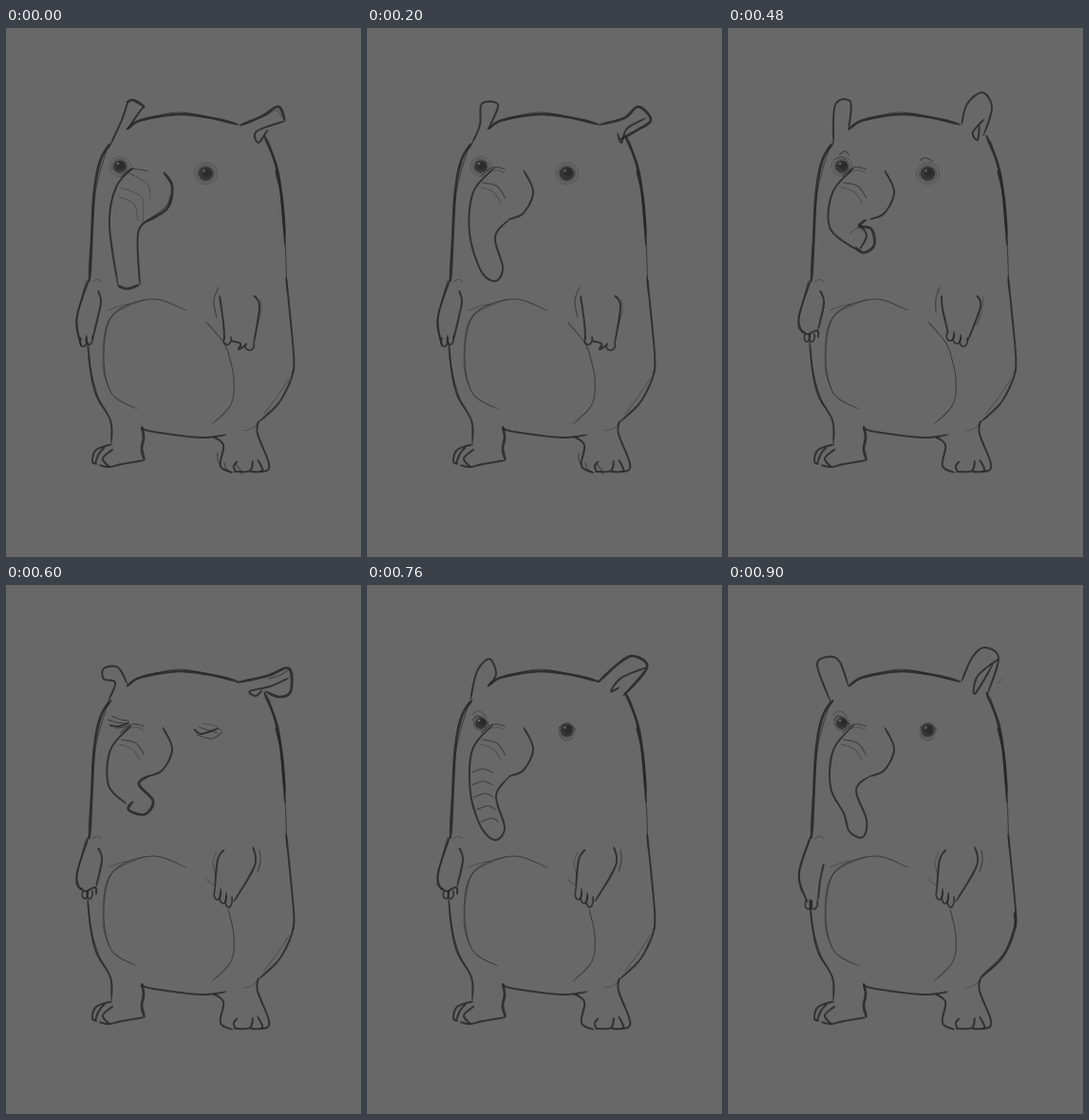
These frames come from a looping animation (374 by 558 pixels, 1 s). An HTML page with a canvas:

```html
<!DOCTYPE html>
<html lang="en">
<head>
<meta charset="utf-8">
<title>Sketched tapir</title>
<style>
html, body { margin: 0; width: 100%; height: 100%; overflow: hidden; background: #686868; }
canvas { display: block; width: 374px; height: 558px; }
</style>
</head>
<body>
<canvas id="stage"></canvas>
<script>
const W = 374, H = 558, LOOP = 1000, INK = '#262626';
const canvas = document.getElementById('stage');
const ctx = canvas.getContext('2d');
const scale = Math.max(1, window.devicePixelRatio || 1);
canvas.width = W * scale;
canvas.height = H * scale;

function spline(points) {
  const out = [], last = points.length - 1;
  for (let i = 0; i < last; i++) {
    const quad = [-1, 0, 1, 2].map(k => points[Math.min(last, Math.max(0, i + k))]);
    for (let t = 0; t < 1; t += 1 / 12) {
      out.push([0, 1].map(axis => {
        const [a, b, c, d] = quad.map(p => p[axis]);
        return b + t * ((c - a) + t * ((2 * a - 5 * b + 4 * c - d) + t * (3 * (b - c) + d - a))) / 2;
      }));
    }
  }
  return out.concat([points[last]]);
}

// Pencil stroke through "x,y" points: a filled ribbon with tapering ends.
function stroke(width, alpha, text) {
  const path = spline(text.split(' ').map(p => p.split(',').map(Number)));
  const n = path.length - 1, left = [], right = [];
  path.forEach(([x, y], i) => {
    const a = path[Math.max(0, i - 1)], b = path[Math.min(n, i + 1)];
    const dx = b[0] - a[0], dy = b[1] - a[1], len = Math.hypot(dx, dy) || 1;
    const taper = 0.45 + 0.55 * Math.min(1, 4 * Math.sin(Math.PI * i / n));
    const r = width / 2 * taper * (1 + 0.06 * Math.sin(i / 2));
    left.push([x - dy / len * r, y + dx / len * r]);
    right.unshift([x + dy / len * r, y - dx / len * r]);
  });
  ctx.globalAlpha = alpha;
  ctx.beginPath();
  left.concat(right).forEach(p => ctx.lineTo(...p));
  ctx.fill();
}
const bold = text => stroke(2.8, 0.84, text);
const ink = text => stroke(2, 0.82, text);
const thin = text => stroke(1.1, 0.62, text);
const faint = text => stroke(0.9, 0.42, text);

// A row of small hooked nails.
function nails(x, y, step, count, slope = 0, size = 9) {
  for (let i = 0; i < count; i++, x += step, y += slope) {
    stroke(1.7, 0.8, `${x},${y} ${x - 0.5},${y + size * 0.7} ${x + step * 0.5},${y + size} ${x + step},${y + size * 0.6} ${x + step},${y}`);
  }
}

function oval(x, y, r, alpha, line) {
  ctx.globalAlpha = alpha;
  ctx.beginPath();
  ctx.ellipse(x, y, r, r * 0.95, 0, 0, 2 * Math.PI);
  ctx.lineWidth = line;
  line ? ctx.stroke() : ctx.fill();
}

function eye(x, y, size, heavy) {
  oval(x, y, size, 0.75);
  oval(x + 1, y - 1, size * 0.6, 0.6);
  oval(x, y, size + 1.3, 0.5, 0.8);
  if (!heavy) oval(x, y, size + 4, 0.4, 0.8);
  ctx.fillStyle = '#777';
  oval(x - 2, y - 3, 1.3, 0.8);
  ctx.fillStyle = INK;
}

function eyes(heavy) {
  eye(120, 146, heavy ? 6.5 : 7, heavy);
  eye(210.5, 153.5, heavy ? 7 : 8, heavy);
}

function body() {
  bold('127,107 143,97 182,91 217,95 245,102');
  thin('143,98 183,89 237,100');
  bold('111,121 100,138 93,172 90,230 88,268');
  thin('108,122 95,168 90,215 87,264');
  bold('272,113 284,143 290,175 294,220');
  thin('277,120 290,172 294,225 296,279');
  ink('284,150 290,178 294,230');
  ink('295,262 298,290 303,343 303,363');
  ink('86,331 89,360 95,387 110,414 111,438');
  thin('87,345 90,366 100,398');
  faint('91,268 96,265 101,268');
}

function bellyAndLegs() {
  thin('190,298 154,286 113,302 103,345 111,385 138,402');
  faint('147,286 109,307 102,355 109,381');
  faint('107,298 117,294 130,291');
  thin('234,342 240,370 237,397 217,418');
  ink('142,422 156,426 205,432 232,429');
  bold('143,420 145,432 143,444 146,456');
  ink('146,456 122,460 109,463 98,461');
  ink('112,439 95,445 91,457 96,460');
  ink('104,442 98,449 94,459');
  ink('113,444 102,454 109,463');
  ink('218,431 229,440 226,462 239,469');
  ink('266,414 265,428 276,456 276,466 267,468');
  ink('242,469 240,462 244,457');
  ink('242,468 257,467 260,456');
  ink('257,468 270,467 265,455');
  faint('250,425 260,422 270,412');
}

const sides = {
  slim() {
    ink('303,360 299,374 287,396 267,415');
    faint('299,369 284,391 271,408');
  },
  full() {
    bold('302,345 302,362 290,391 266,414');
  }
};

const leftArms = {
  down() {
    ink('88,263 76,299 75,316 79,336');
    thin('85,266 74,309 78,330');
    ink('97,277 100,288 97,304 91,329');
    nails(79, 326, 6, 2, -2, 10);
  },
  raised() {
    ink('88,263 76,299 75,313 79,322');
    thin('85,266 74,309 77,320');
    ink('97,277 101,290 95,318');
    ink('78,319 84,323 94,319 95,327');
    nails(81, 322, 5, 2, 0, 9);
  },
  low() {
    ink('88,263 76,297 76,315 84,335');
    thin('86,269 75,305 78,325');
    ink('101,294 97,312 95,332');
    nails(82, 332, 6, 2, 0, 10);
  }
};

const rightArms = {
  down() {
    thin('224,273 219,288 222,306');
    ink('225,282 229,311 230,329');
    ink('261,282 267,294 261,333');
    faint('268,286 269,298 265,313');
    nails(230, 325, 7, 1, 0, 9);
    ink('237,330 247,333 245,339 253,334');
    nails(253, 332, 8, 1, 0, 8);
    thin('223,448 223,455 226,461');
    thin('230,458 232,465 238,470');
    thin('241,459 247,466 248,471');
    thin('211,310 228,330 235,344');
  },
  inward() {
    thin('223,273 219,286 219,301');
    ink('225,282 226,296 232,322');
    ink('262,282 266,294 253,329');
    faint('269,283 267,300 262,314');
    nails(231, 320, 7, 3, 3, 10);
    thin('211,310 228,330 235,344');
  },
  across() {
    ink('230,279 223,290 220,321');
    faint('222,281 218,293 221,305');
    ink('260,276 262,296 240,334');
    thin('267,279 268,291 265,303');
    nails(220, 320, 6, 3, 4, 12);
    faint('211,310 215,314 219,316');
  }
};

function muzzle() {
  ink('165,150 175,173 165,195 149,202');
  thin('120,156 133,147 146,149');
  faint('127,152 137,150 145,153');
  thin('121,163 137,167 146,180');
  faint('119,168 133,173 142,186');
}

const trunks = {
  straight() {
    ink('134,147 116,168 109,207 118,272');
    bold('118,272 128,275 140,271');
    ink('141,271 139,217 151,202');
    bold('148,204 170,190 175,167 166,152');
    thin('143,207 168,189 173,176');
    thin('121,157 132,149 151,151');
    faint('128,152 149,165 152,181');
    faint('120,168 143,179 144,205');
    faint('119,178 135,186 139,204');
  },
  sway() {
    muzzle();
    ink('135,147 112,173 108,216 120,256 135,267 143,253 135,220 151,201');
  },
  curled() {
    muzzle();
    ink('132,148 110,174 108,212 139,236');
    bold('146,202 138,209 151,212 154,229 143,237 134,231');
    ink('139,207 146,219 139,233');
    faint('128,217 137,211 142,215');
  },
  hooked() {
    muzzle();
    ink('132,148 110,174 108,211 127,231');
    bold('151,201 140,210 155,228 146,242 129,237 134,228');
  },
  ribbed() {
    muzzle();
    ink('133,147 111,174 109,219 120,255 135,269 145,256 136,222 151,201');
    for (let i = 0; i < 5; i++) {
      const x = 110 + i * i * 0.6, y = 198 + i * 13;
      thin(`${x},${y} ${x + 12},${y - 4} ${x + 23 - i},${y}`);
    }
  },
  left() {
    muzzle();
    ink('132,148 110,174 104,219 104,259 114,264 127,258 129,225 151,200');
    faint('131,267 137,266');
  },
  bent() {
    muzzle();
    ink('133,147 111,174 108,213 122,241 128,260 142,266 146,248 135,216 150,201');
  }
};

const ears = {
  blown() {
    ink('111,121 122,97 128,79');
    bold('127,79 134,76 146,83');
    ink('146,83 141,88 128,107');
    bold('246,103 270,93 287,83 294,98');
    ink('294,98 264,109 266,121 276,107');
    faint('273,93 285,87 292,96');
  },
  tilted() {
    ink('111,121 119,102 121,80 138,81 128,106');
    bold('245,102 271,95 286,83 299,97 284,108 266,118');
    ink('264,111 268,121 274,106 294,95');
  },
  upright() {
    ink('111,121 113,81 129,78 127,108');
    ink('246,102 252,80 268,68 278,84 269,114');
    ink('270,96 258,110 263,118 265,102');
  },
  flopped() {
    ink('108,122 115,103 103,99 103,88 118,87 128,105');
    bold('243,103 275,96 298,88 300,112 288,118 273,112');
    ink('298,98 278,107 257,112 263,117 270,111');
    thin('276,99 289,95 298,89');
  },
  swung() {
    ink('109,121 116,91 129,78 136,94 127,107');
    bold('243,103 266,82 281,75 295,87 270,117');
    ink('294,87 268,98 257,112 266,108');
  },
  raised() {
    ink('108,123 102,88 113,73 123,85 127,108');
    ink('243,103 250,73 265,65 274,74 273,112');
    ink('270,67 258,102 263,115 268,88');
    faint('284,104 289,99');
  },
  spread() {
    ink('108,123 94,85 104,76 117,80 127,107');
    ink('246,102 257,77 270,66 285,77 273,116');
    ink('285,78 263,96 260,115 279,84');
    faint('284,104 289,99');
  }
};

const looks = {
  calm() {
    eyes(false);
  },
  brows() {
    eyes(false);
    thin('117,134 123,130 128,134');
    thin('202,140 208,137 216,141');
    faint('111,139 119,136 126,140');
  },
  shut() {
    ink('109,148 119,149 130,145');
    thin('111,138 121,142 130,143');
    thin('107,142 117,145 126,146');
    thin('115,151 124,150 130,147');
    ink('198,152 206,157 224,151');
    thin('203,150 213,153 223,156');
    thin('201,158 217,162 228,155');
    faint('207,146 219,148 228,154');
  },
  heavy() {
    eyes(true);
    thin('111,143 117,138 129,148');
    thin('202,151 211,146 220,153');
    faint('110,137 118,133 126,139');
    faint('202,158 209,164 218,161');
  }
};

// start, ears, trunk, left arm, right arm, look
const poses = [
  [0, 'blown', 'straight', 'down', 'down', 'calm'],
  [200, 'tilted', 'sway', 'down', 'down', 'calm'],
  [300, 'upright', 'curled', 'raised', 'inward', 'brows'],
  [600, 'flopped', 'hooked', 'raised', 'across', 'shut'],
  [700, 'swung', 'ribbed', 'raised', 'across', 'heavy'],
  [800, 'raised', 'left', 'low', 'across', 'heavy'],
  [900, 'spread', 'bent', 'low', 'across', 'heavy']
];

function draw([, ear, trunk, leftArm, rightArm, look]) {
  ctx.setTransform(scale, 0, 0, scale, 0, 0);
  ctx.globalAlpha = 1;
  ctx.fillStyle = '#686868';
  ctx.fillRect(0, 0, W, H);
  ctx.fillStyle = ctx.strokeStyle = INK;
  looks[look]();
  body();
  sides[leftArm === 'low' ? 'full' : 'slim']();
  bellyAndLegs();
  leftArms[leftArm]();
  rightArms[rightArm]();
  ears[ear]();
  trunks[trunk]();
}

const start = performance.now();
let shown;
function tick() {
  const time = (performance.now() - start) % LOOP;
  const pose = poses.filter(p => p[0] <= time).pop();
  if (pose !== shown) draw(shown = pose);
  requestAnimationFrame(tick);
}
tick();
</script>
</body>
</html>
```
